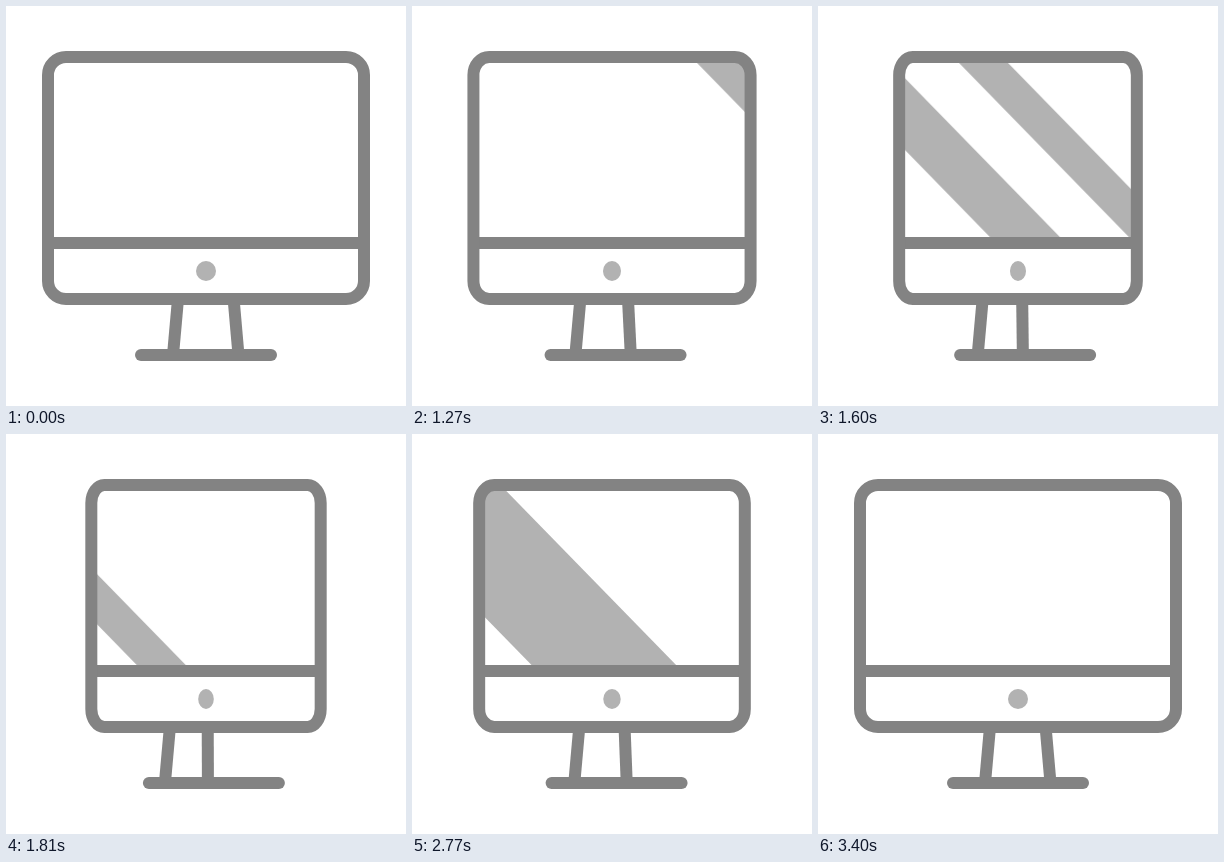
Animation of 400x400 px, one loop 3.43 s. Source, as an HTML page:

```html
<!DOCTYPE html>
<html lang="en">
<head>
<meta charset="utf-8">
<title>Turning monitor</title>
<style>
  /* 0 = facing front, 1 = fully turned */
  @property --turn { syntax: "<number>"; inherits: true; initial-value: 0; }

  html, body { margin: 0; width: 100%; height: 100%; overflow: hidden; background: #fff; }
  svg {
    display: block; width: 100%; height: 100%;
    --dark: #838383; --light: #b2b2b2;
    animation: turn 3430ms infinite;
  }
  @keyframes turn {
    0% { --turn: 0; animation-timing-function: linear; }
    29.155% { --turn: 0; animation-timing-function: cubic-bezier(.3, .15, .1, 1); }
    64.14% { --turn: 1; animation-timing-function: cubic-bezier(.55, 0, .45, 1); }
    99.125%, 100% { --turn: 0; }
  }

  .case {
    x: calc(42px + 45.5px * var(--turn));
    width: calc(316px - 91px * var(--turn));
    rx: calc(18px - 5.2px * var(--turn));
    ry: 18px;
  }
  .line { fill: none; stroke: var(--dark); stroke-width: 12; }
  .bar { fill: var(--dark); transform-origin: 200px 237px; transform: scaleX(calc(1 - .288 * var(--turn))); }
  .button { fill: var(--light); transform-origin: 200px 265px; transform: scaleX(calc(1 - .23 * var(--turn))); }
  .left { transform: translateX(calc(-8.5px * var(--turn))); }
  .right {
    transform-origin: 200.4px 293px;
    transform: translateX(calc(27.2px * (1 - var(--turn)))) skewX(calc(5deg * (1 - var(--turn))));
  }
  .base { stroke-linecap: round; transform: translateX(calc(8.3px * var(--turn))); }

  .shine { fill: var(--light); }
  .out { animation: out 3430ms linear infinite; }
  @keyframes out {
    0%, 33.528% { transform: translateX(386px); }
    58.309%, 100% { transform: translateX(-343px); }
  }
  .back { animation: back 3430ms linear infinite; }
  @keyframes back {
    0%, 72.303% { d: path("M-138 51L43.5 237L-136.5 237L-318 51Z"); }
    95.044%, 100% { d: path("M469 51L650.5 237L565.5 237L384 51Z"); }
  }
</style>
</head>
<body>
<svg viewBox="0 0 400 400">
  <clipPath id="screen"><rect class="case" y="51" height="242"/></clipPath>
  <g class="shine" clip-path="url(#screen)">
    <path class="out" d="M136 51H185L366.5 237H317.5Z M-3 51H67L248.5 237H178.5Z"/>
    <path class="back" d="M-138 51L43.5 237L-136.5 237L-318 51Z"/>
  </g>
  <path class="line left" d="M172 293L167 349"/>
  <path class="line right" d="M200.4 293V349"/>
  <path class="line base" d="M135 349H265"/>
  <rect class="bar" x="42" y="231" width="316" height="12"/>
  <rect class="case line" y="51" height="242"/>
  <circle class="button" cx="200" cy="265" r="10"/>
</svg>
</body>
</html>
```
